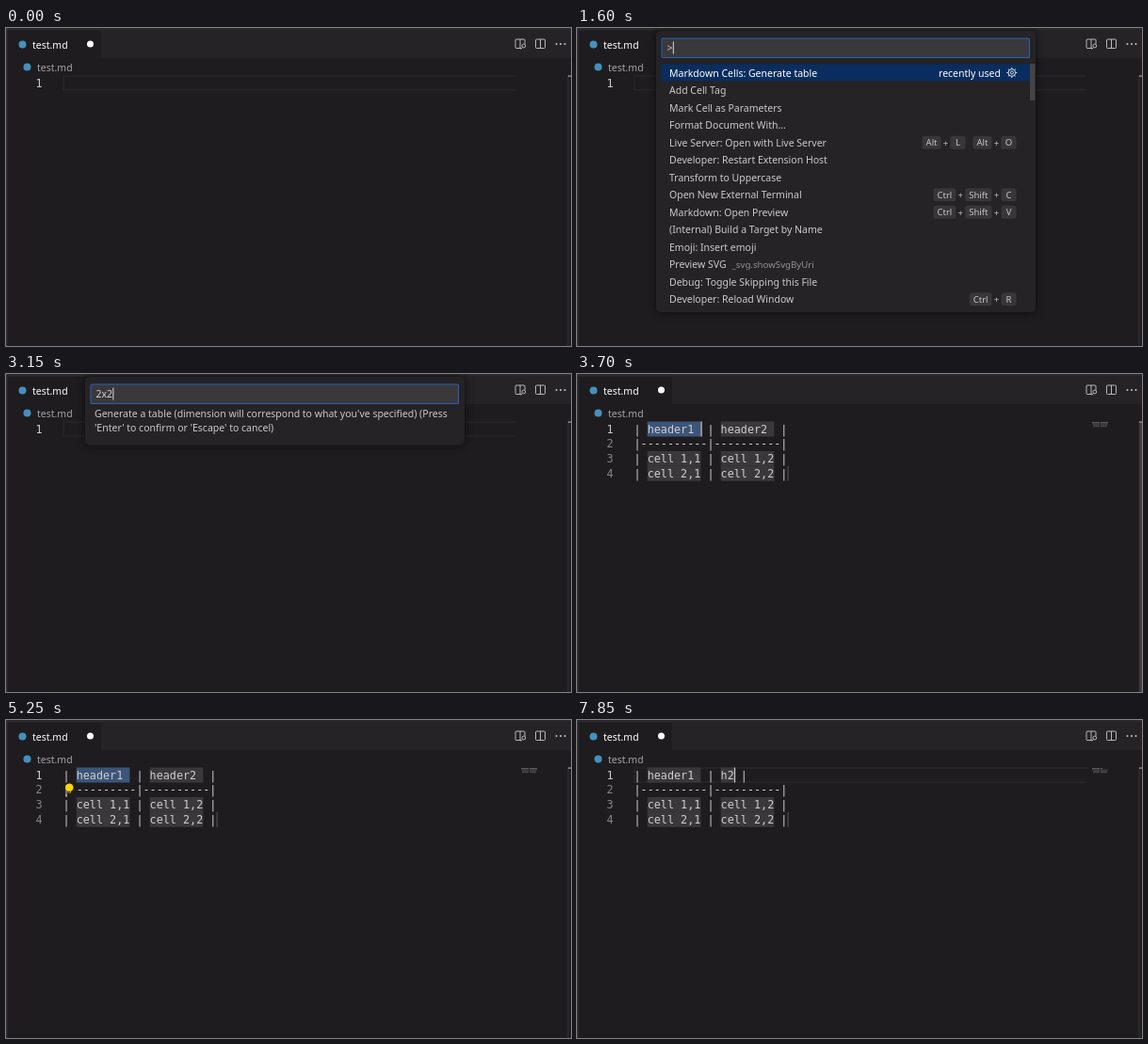
Recreate the animation shown at these times as an HTML page with a canvas. Size 600 by 338 pixels, loop 8000 ms.

```html
<!DOCTYPE html>
<html lang="en">
<head>
<meta charset="utf-8">
<title>Generate a Markdown table</title>
<style>
html, body { margin: 0; width: 100%; height: 100%; overflow: hidden; background: #1e1c1e; }
canvas { display: block; width: 600px; height: 338px; }
</style>
</head>
<body>
<canvas id="stage"></canvas>
<script>
const W = 600, H = 338, LOOP = 8000;
const canvas = document.getElementById('stage');
const c = canvas.getContext('2d');
const dpr = window.devicePixelRatio || 1;
canvas.width = W * dpr;
canvas.height = H * dpr;

const UI = '"Noto Sans", "Open Sans", sans-serif';
const MONO = '"DejaVu Sans Mono", monospace';
const CODE_X = 60.5, CHAR = 7.09, ROW_H = 15.75;
const BG = '#1e1c1e', PANEL = '#252326';

// [label, shortcut chords, detail]
const COMMANDS = [
  ['Markdown Cells: Generate table'],
  ['Add Cell Tag'],
  ['Mark Cell as Parameters'],
  ['Format Document With...'],
  ['Live Server: Open with Live Server', [['Alt', 'L'], ['Alt', 'O']]],
  ['Developer: Restart Extension Host'],
  ['Transform to Uppercase'],
  ['Open New External Terminal', [['Ctrl', 'Shift', 'C']]],
  ['Markdown: Open Preview', [['Ctrl', 'Shift', 'V']]],
  ['(Internal) Build a Target by Name'],
  ['Emoji: Insert emoji'],
  ['Preview SVG', null, '_svg.showSvgByUri'],
  ['Debug: Toggle Skipping this File'],
  ['Developer: Reload Window', [['Ctrl', 'R']]]
];

function rect(x, y, w, h, color) {
  c.fillStyle = color;
  c.fillRect(x, y, w, h);
}

function round(x, y, w, h, r, color) {
  c.beginPath();
  c.roundRect(x, y, w, h, r);
  c.fillStyle = color;
  c.fill();
}

function disc(x, y, r, color) {
  c.beginPath();
  c.arc(x, y, r, 0, Math.PI * 2);
  c.fillStyle = color;
  c.fill();
}

function text(s, x, y, color, size = 10.5, family = UI, align = 'left') {
  c.font = `${size}px ${family}`;
  c.textAlign = align;
  c.fillStyle = color;
  c.fillText(s, x, y);
  return c.measureText(s).width;
}

const colX = col => CODE_X + col * CHAR;
const rowY = row => 50.5 + row * ROW_H;

function code(s, row, col = 0) {
  text(s, colX(col), rowY(row) + 12, '#cfcdcf', 11.78, MONO);
}

function splitIcon(x) {
  c.strokeStyle = '#b9b7b9';
  c.lineWidth = 1;
  c.beginPath();
  c.roundRect(x + .5, 12, 10, 9.5, 1);
  c.moveTo(x + 5.5, 12);
  c.lineTo(x + 5.5, 21.5);
  c.stroke();
}

function frame() {
  rect(0, 0, W, H, BG);
  rect(101, 3, W - 101, 29, PANEL);
  rect(0, 0, W, 2.5, '#2b292c');
  rect(0, 0, 1.5, H, '#323033');

  disc(17.5, 17.5, 4, '#4490bd');
  text('test.md', 28, 21.5, '#ffffff');
  disc(89.5, 17, 3.5, '#ffffff');
  disc(22.5, 41.5, 4, '#4490bd');
  text('test.md', 33, 45.5, '#a5a3a5');

  splitIcon(540.5);
  rect(547, 17, 6, 6, PANEL);
  c.beginPath();
  c.arc(549.8, 19, 1.9, 0, Math.PI * 2);
  c.moveTo(548.4, 20.5);
  c.lineTo(546.8, 22.5);
  c.stroke();
  splitIcon(562);
  for (const x of [584.5, 589, 593.5]) disc(x, 17, 1, '#c9c7c9');
}

function overview(t) {
  rect(596.5, 50, 1, H - 50, '#343234');
  if (t >= 3700 && t < 4700) rect(597.5, 51, 2.5, H - 51, '#424042');
  rect(597, 50.5, 3, 1.2, '#aaa8a6');
}

function lineNumbers(count) {
  for (let i = 0; i < count; i++) {
    text(i + 1, 38.5, rowY(i) + 12, i ? '#858385' : '#cac8ca', 11.78, MONO, 'right');
  }
}

function currentLine() {
  rect(60.5, 50.5, 481, 1, '#2d2b2d');
  rect(60.5, 65.5, 481, 1, '#2d2b2d');
  rect(60.5, 50.5, 1, 16, '#2d2b2d');
}

function caret(x) {
  rect(x, 50.5, 1.3, 16, '#c8c6c4');
}

function bulb() {
  rect(62.5, 68, 10, 11, BG);
  code('|', 1);
  disc(67.3, 71.8, 4.3, '#f7d40c');
  rect(65.6, 75.3, 3.4, 2.2, '#c9ab17');
  rect(66.6, 76, 1.4, 1, BG);
}

function minimap(second) {
  const dim = '#5a5a5a';
  rect(547, 51, 8, 1.4, dim);
  rect(556, 51, second.length, 1.4, dim);
  rect(547, 52.6, 17, .8, '#454545');
  for (const y of [53.6, 55.2]) {
    rect(548, y, 7, 1, '#505050');
    rect(556, y, 7, 1, '#505050');
  }
}

function table(t) {
  const second = t < 7450 ? 'header2 ' : t < 7500 ? 'h' : 'h2';
  const typing = t >= 7450;
  const active = t < 6550 ? 0 : 1;

  if (typing) currentLine();
  for (const row of [0, 2, 3]) {
    for (const k of [0, 1]) {
      const len = row === 0 && k ? second.length : 8;
      const on = row === 0 && k === active && !typing;
      rect(colX(2 + 11 * k), rowY(row), len * CHAR, row === 2 ? ROW_H : 16, on ? '#3d5579' : '#3a383a');
    }
  }
  code('| header1  | ' + second + ' |', 0);
  code('|----------|----------|', 1);
  code('| cell 1,1 | cell 1,2 |', 2);
  code('| cell 2,1 | cell 2,2 |', 3);
  rect(colX(23), rowY(3), 1, 16, '#59575a');
  minimap(second);

  if (t >= 4000 && t < 7850) bulb();
  const lit = t < 6550 ? Math.floor((t - 3700) / 510) % 2 === 0 : t < 7050 || typing;
  if (lit) caret(active ? colX(13 + second.length) : colX(10));
}

function keys(chords, y) {
  let x = 466.5;
  for (const chord of [...chords].reverse()) {
    [...chord].reverse().forEach((key, i) => {
      if (i) {
        text('+', x - 5, y + 4, '#c5c3c5', 9.5, UI, 'center');
        x -= 10;
      }
      c.font = `9.5px ${UI}`;
      const w = Math.max(16, c.measureText(key).width + 8);
      round(x - w, y - 7, w, 14, 2.5, '#383639');
      text(key, x - w / 2, y + 3.5, '#c8c6c8', 9.5, UI, 'center');
      x -= w;
    });
    x -= 8;
  }
}

function gear(x, y) {
  c.strokeStyle = '#dde4ee';
  c.lineWidth = 1;
  c.beginPath();
  c.arc(x, y, 3.8, 0, Math.PI * 2);
  c.moveTo(x + 1.5, y);
  c.arc(x, y, 1.5, 0, Math.PI * 2);
  for (let i = 0; i < 8; i++) {
    const a = i * Math.PI / 4, dx = Math.cos(a), dy = Math.sin(a);
    c.moveTo(x + dx * 4, y + dy * 4);
    c.lineTo(x + dx * 5.5, y + dy * 5.5);
  }
  c.stroke();
}

function panel(bottom, value) {
  c.save();
  c.shadowColor = 'rgba(0,0,0,.6)';
  c.shadowBlur = 8 * dpr;
  round(84, 3, 403, bottom - 3, 5, PANEL);
  c.restore();
  round(89.5, 10.5, 391.5, 21.5, 1.5, '#2a62b0');
  rect(90.5, 11.5, 389.5, 19.5, '#3a383b');
  const w = text(value, 95.5, 25, '#d2d0d2');
  rect(95.5 + w + .3, 14.5, 1, 13, '#d8d6d8');
}

function commandList() {
  panel(302, '>');
  rect(89.5, 38.5, 392, 18, '#092d5e');
  rect(481, 38, 5.5, 39, '#454346');
  COMMANDS.forEach(([label, chords, detail], i) => {
    const y = 47.7 + i * 18.5;
    const w = text(label, 98, y + 3.8, i ? '#cbc9cb' : '#ffffff');
    if (chords) keys(chords, y);
    if (detail) text(detail, 98 + w + 6, y + 3.8, '#949294', 9.7);
  });
  text('recently used', 450, 51.5, '#ffffff', 10.5, UI, 'right');
  gear(461.8, 47.5);
}

function inputBox(t) {
  const value = t < 2950 ? '' : t < 3000 ? '2' : t < 3150 ? '2x' : '2x2';
  panel(75.5, value);
  if (!value && t >= 2200) text('Table dimension (rows x cols)', 95.5, 25, '#8b898b');
  text("Generate a table (dimension will correspond to what you've specified) (Press", 94, 46.3, '#c9c7c9');
  text("'Enter' to confirm or 'Escape' to cancel)", 94, 61, '#c9c7c9');
}

function draw(t) {
  c.setTransform(dpr, 0, 0, dpr, 0, 0);
  frame();
  overview(t);
  if (t < 3700) {
    lineNumbers(1);
    currentLine();
    if (t >= 750 && t < 1250) caret(60.5);
    if (t >= 2050) inputBox(t);
    else if (t >= 1600) commandList();
  } else {
    lineNumbers(4);
    table(t);
  }
}

const start = performance.now();
function tick(now) {
  draw(Math.max(0, now - start) % LOOP);
  requestAnimationFrame(tick);
}
draw(0);
requestAnimationFrame(tick);
</script>
</body>
</html>
```
